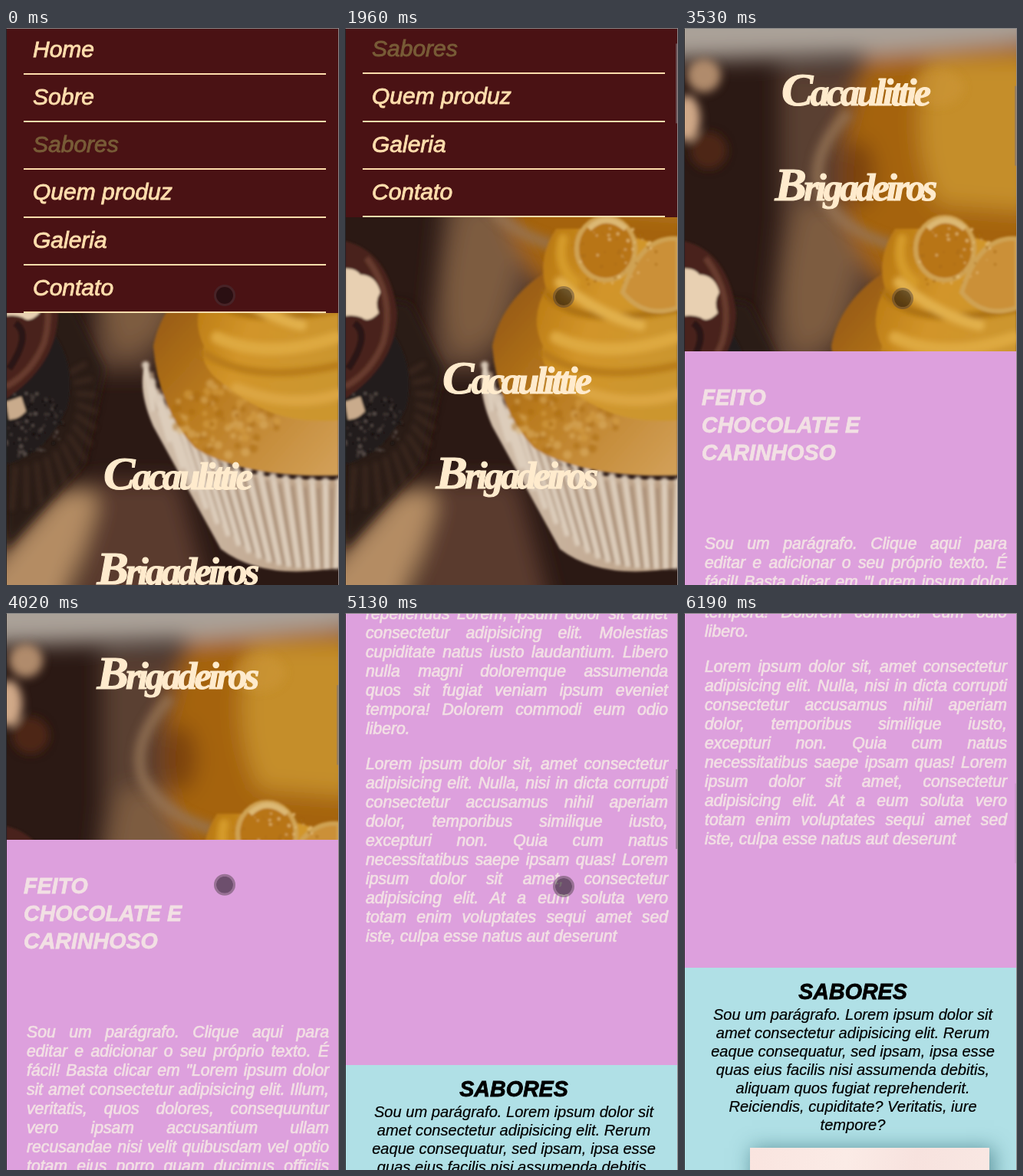
Write an HTML page that moves like this. It is 434 by 727 pixels and loops after 6330 ms.

```html
<!DOCTYPE html>
<html lang="pt">
<head>
<meta charset="utf-8">
<style>
  html, body { margin: 0; width: 100%; height: 100%; overflow: hidden; background: #231413; }
  #stage { position: relative; width: 434px; height: 727px; overflow: hidden;
    font-family: "Liberation Sans", Arial, sans-serif; font-style: italic; }
  #stage > *, section, section > *, h1 { position: absolute; margin: 0; }
  #photo { left: 0; top: 0; }
  #page { left: 0; top: 0; width: 434px; height: 2500px; will-change: transform; }
  section { left: 0; width: 434px; }

  #menu { top: 0; height: 372px; background: #4a1214; }
  ul { top: -1.2px; left: 23px; width: 394px; padding: 0; list-style: none; }
  li { box-sizing: border-box; height: 62.2px; padding-left: 12px; border-bottom: 2px solid #ffdead;
    font-size: 30px; line-height: 57px; color: #ffdead; -webkit-text-stroke: .9px; }
  li.hover { color: #785c37; }

  h1 { width: 445px; text-align: center; font: italic bold 50px/60px "Liberation Serif", "Times New Roman", serif;
    letter-spacing: -3.8px; color: #ffebcd; -webkit-text-stroke: 1.2px; }
  h1::first-letter { font-size: 62px; line-height: 1px; }

  #about { top: 923px; height: 1040px; background: #dda0dd; color: #f2e0e4; }
  h2 { font-size: 28.6px; -webkit-text-stroke: .8px; }
  #about h2 { left: 23px; top: 42px; line-height: 36px; }
  #about p { left: 27px; width: 394px; font-size: 21.2px; line-height: 25px; white-space: nowrap;
    text-align: justify; text-align-last: justify; -webkit-text-stroke: .7px; }
  #about span { display: block; text-align-last: left; }

  #flavours { top: 1963px; height: 537px; background: #b0e0e6; color: #000; text-align: center; }
  #flavours h2 { left: 0; width: 440px; top: 13px; line-height: 36px; }
  #flavours p { left: 0; width: 440px; top: 49px; font-size: 20.1px; line-height: 24px; white-space: nowrap;
    -webkit-text-stroke: .2px; }
  #card { left: 86px; top: 235px; width: 312px; height: 300px;
    background: linear-gradient(100deg, #f9e4df, #fbebe6 35%, #f7e2de 60%, #faeae5);
    box-shadow: 4px 2px 24px 2px rgba(20, 80, 90, .5); }

  #thumb { left: 431px; top: 0; width: 3px; height: 104px; background: rgba(125, 115, 120, .6); }
  #touch { left: -14px; top: -14px; width: 22px; height: 22px; border: 3px solid rgba(70, 58, 62, .45);
    border-radius: 50%; background: rgba(18, 14, 18, .55); background-clip: padding-box; }
  #edge { inset: 0; border: solid; border-width: 1px 1px 0 1px; border-color: #858585 #8f8889 #000 #26262a; }
</style>
</head>
<body>
<div id="stage">
  <svg id="photo" width="434" height="727">
    <defs>
      <filter id="far" x="-50%" y="-50%" width="200%" height="200%"><feGaussianBlur stdDeviation="14"/></filter>
      <filter id="mid" x="-50%" y="-50%" width="200%" height="200%"><feGaussianBlur stdDeviation="6"/></filter>
      <filter id="soft" x="-30%" y="-30%" width="160%" height="160%"><feGaussianBlur stdDeviation="3"/></filter>
      <filter id="near" x="-20%" y="-20%" width="140%" height="140%"><feGaussianBlur stdDeviation="1.4"/></filter>
      <linearGradient id="cake" x1="0" y1="0" x2="1" y2="1">
        <stop stop-color="#8c500f"/><stop offset=".45" stop-color="#b97a1d"/><stop offset="1" stop-color="#d3a15a"/>
      </linearGradient>
      <linearGradient id="icing" x1="0" y1="0" x2="1" y2=".5">
        <stop stop-color="#b4730c"/><stop offset=".5" stop-color="#d2952a"/><stop offset="1" stop-color="#cc962f"/>
      </linearGradient>
      <linearGradient id="paper" x1="0" x2="1">
        <stop stop-color="#d2bfab"/><stop offset=".5" stop-color="#c5ae98"/><stop offset="1" stop-color="#b89c80"/>
      </linearGradient>
    </defs>
    <rect width="434" height="727" fill="#2b1914"/>
    <g filter="url(#far)">
      <path d="M125 50H260V330L190 450H105L125 250Z" fill="#5a4031"/>
      <path d="M150 230H250L200 400L150 430Q110 380 150 230Z" fill="#7d5b40"/>
      <path d="M240 20H460V340H265Q190 270 205 150Z" fill="#a5640f"/>
      <path d="M320 40H460V240L330 230Q290 140 320 40Z" fill="#c58e2c"/>
      <ellipse cx="225" cy="190" rx="24" ry="45" fill="#7c430f"/>
      <path d="M-30-30H464V16L250 34L-30 42Z" fill="#aaa198"/>
      <path d="M110 590H225L270 760H90Z" fill="#5a3b2d"/>
      <path d="M-30 715L60 612Q110 580 118 625L70 770H-30Z" fill="#b48c64"/>
    </g>
    <g filter="url(#mid)">
      <path d="M215 110Q162 165 178 215Q200 262 275 285" fill="none" stroke="#977555" stroke-width="15" opacity=".8"/>
      <circle cx="26" cy="62" r="22" fill="#b08b6c"/>
      <ellipse cx="4" cy="118" rx="17" ry="30" fill="#d0a988"/>
      <circle cx="32" cy="160" r="24" fill="#4d2619"/>
      <ellipse cx="330" cy="78" rx="34" ry="24" fill="#d09c3c" opacity=".4"/>
      <path d="M0 345L85 360L128 445L100 570L0 680Z" fill="#2a1a16"/>
    </g>
    <g id="darkPleats" filter="url(#soft)" stroke="#493026" stroke-width="6" opacity=".6"></g>
    <g filter="url(#near)">
      <path d="M0 380L62 398Q92 440 80 495Q55 555 0 570Z" fill="#241b1a"/>
      <g id="crumbs" opacity=".7"></g>
      <path d="M0 278Q58 292 68 372Q66 440 0 484Z" fill="#48231b"/>
      <path d="M28 300Q66 350 50 410Q34 450 0 468" fill="none" stroke="#673a2e" stroke-width="8" filter="url(#near)"/>
      <path d="M12 385Q34 400 4 445" fill="none" stroke="#2c1512" stroke-width="9"/>
      <path d="M0 314Q14 313 20 322Q40 322 46 345Q38 358 44 372Q30 386 22 378Q12 374 0 376Z" fill="#e8d0b2"/>
      <path d="M0 488L20 481L26 500Q16 512 4 511Z" fill="#c9ab8c"/>
    </g>
    <g filter="url(#near)">
      <path d="M182 436Q196 515 244 556Q310 592 434 590V704Q335 722 280 680Q236 600 192 520Q170 470 182 436Z" fill="url(#paper)"/>
      <g id="pleats" fill="none" filter="url(#near)"></g>
      <path d="M272 312Q205 350 192 415Q198 495 246 548Q310 588 434 584V350Z" fill="url(#cake)"/>
      <g id="sponge" opacity=".5" filter="url(#near)"></g>
      <path d="M275 262Q250 300 262 340Q240 380 258 415Q250 445 292 470Q350 520 434 512V290L340 262Z" fill="url(#icing)"/>
      <g fill="none" stroke-linecap="round" filter="url(#soft)">
        <path d="M262 345Q300 395 434 366" stroke="#a96e10" stroke-width="9"/>
        <path d="M258 424Q320 466 434 440" stroke="#b67915" stroke-width="9"/>
        <path d="M280 332Q330 375 385 388" stroke="#e2b04b" stroke-width="14"/>
        <path d="M275 404Q340 434 430 404" stroke="#dea941" stroke-width="16"/>
        <path d="M300 470Q370 498 434 478" stroke="#dca643" stroke-width="14"/>
        <path d="M284 275Q275 310 300 332" stroke="#d59b2c" stroke-width="13"/>
      </g>
      <g stroke="#cfa253" stroke-width="6">
        <ellipse cx="340" cy="288" rx="38" ry="41" fill="#b87516"/>
        <path d="M362 345Q385 270 434 275V365Q390 380 362 345Z" fill="#cb9038"/>
      </g>
      <path d="M318 262Q340 240 366 262" fill="none" stroke="#dcb873" stroke-width="7"/>
      <g id="sugar" opacity=".7"></g>
    </g>
  </svg>

  <div id="page">
    <section id="menu"><ul>
      <li>Home<li>Sobre<li class="hover">Sabores<li>Quem produz<li>Galeria<li>Contato
    </ul></section>
    <h1 style="top:555px">Cacaulittie</h1>
    <h1 style="top:679px">Brigadeiros</h1>
    <section id="about">
      <h2>FEITO<br>CHOCOLATE E<br>CARINHOSO</h2>
      <p style="top:237.5px">Sou um parágrafo. Clique aqui para<br>editar e adicionar o seu próprio texto. É<br>fácil! Basta clicar em "Lorem ipsum dolor<br>sit amet consectetur adipisicing elit. Illum,<br>veritatis, quos dolores, consequuntur<br>vero ipsam accusantium ullam<br>recusandae nisi velit quibusdam vel optio<br>totam eius porro quam ducimus officiis<br>repellendus Lorem, ipsum dolor sit amet<br>consectetur adipisicing elit. Molestias<br>cupiditate natus iusto laudantium. Libero<br>nulla magni doloremque assumenda<br>quos sit fugiat veniam ipsum eveniet<br>tempora! Dolorem commodi eum odio<span>libero.</span></p>
      <p style="top:633.5px">Lorem ipsum dolor sit, amet consectetur<br>adipisicing elit. Nulla, nisi in dicta corrupti<br>consectetur accusamus nihil aperiam<br>dolor, temporibus similique iusto,<br>excepturi non. Quia cum natus<br>necessitatibus saepe ipsam quas! Lorem<br>ipsum dolor sit amet, consectetur<br>adipisicing elit. At a eum soluta vero<br>totam enim voluptates sequi amet sed<span>iste, culpa esse natus aut deserunt</span></p>
    </section>
    <section id="flavours">
      <h2>SABORES</h2>
      <p>Sou um parágrafo. Lorem ipsum dolor sit<br>amet consectetur adipisicing elit. Rerum<br>eaque consequatur, sed ipsam, ipsa esse<br>quas eius facilis nisi assumenda debitis,<br>aliquam quos fugiat reprehenderit.<br>Reiciendis, cupiditate? Veritatis, iure<br>tempore?</p>
      <div id="card"></div>
    </section>
  </div>
  <div id="thumb"></div>
  <div id="touch"></div>
  <div id="edge"></div>
</div>

<script>
const LOOP = 6330;
const $ = id => document.getElementById(id);
const clamp = x => Math.min(1, Math.max(0, x));
const smooth = p => p * p * (3 - 2 * p);
const easeOut = p => 1 - (1 - p) ** 2.4;

let seed = 7;
const random = () => (seed = seed * 16807 % 2147483647) / 2147483647;

// Scatter small dots inside an ellipse
function speckle(id, count, cx, cy, rx, ry, colors, size) {
  let dots = '';
  for (let i = 0; i < count; i++) {
    const a = random() * 2 * Math.PI, r = Math.sqrt(random());
    dots += `<circle cx="${cx + rx * r * Math.cos(a)}" cy="${cy + ry * r * Math.sin(a)}"
      r="${size * (.5 + random())}" fill="${colors[i % colors.length]}"/>`;
  }
  $(id).innerHTML = dots;
}

// Folds of the two paper cups
function foldPaper() {
  let light = '', dark = '';
  for (let i = 0; i < 18; i++) {
    const u = i / 17, x = 182 + 252 * u ** 1.2, y = 440 + 152 * (1 - (1 - u) ** 2.6);
    const footX = 192 + 238 * u ** .85, footY = 500 + 206 * (1 - (1 - u) ** 3.6);
    light += `<path d="M${x} ${y}L${footX} ${footY}" stroke="#ddcdbb" stroke-width="7"/>
      <path d="M${x + 8} ${y + 9}L${footX + 6} ${footY}" stroke="#a98e76" stroke-width="4"/>
      <circle cx="${x}" cy="${y}" r="5" fill="#d8c8b6"/>`;
  }
  for (let i = 0; i < 13; i++) {
    const a = -.5 + i * .17, c = Math.cos(a), s = Math.sin(a);
    dark += `<path d="M${10 + 82 * c} ${490 + 82 * s}L${4 + 115 * c} ${500 + 130 * s}"/>`;
  }
  $('pleats').innerHTML = light;
  $('darkPleats').innerHTML = dark;
}

foldPaper();
speckle('crumbs', 170, 18, 515, 58, 46, ['#4a403c', '#120d0d', '#665c58'], 1.8);
speckle('sponge', 110, 285, 510, 70, 48, ['#d9a44a', '#a8690f', '#e0b66c'], 4);
speckle('sugar', 60, 350, 300, 60, 42, ['#eccb8c', '#a96a12'], 1.5);

// [start, end, distance, easing]
const scrolls = [
  [1295, 1600, 125, smooth], [1955, 2240, 125, smooth], [2580, 2810, 125, smooth],
  [2970, 3220, 125, smooth], [3520, 3710, 125, smooth], [4007, 4200, 125, smooth],
  [4600, 5180, 625, easeOut], [5350, 5620, 125, smooth]
];
const scrollAt = t => scrolls.reduce((y, [a, b, d, ease]) => y + d * ease(clamp((t - a) / (b - a))), 0);

function frame(now) {
  const t = now % LOOP, y = scrollAt(t);
  const leave = smooth(clamp((t - 5600) / 570));
  const touchY = 349 + 2 * clamp((t - 1300) / 600) + 6 * clamp((t - 2900) / 1800);
  $('page').style.transform = `translateY(${-Math.round(y)}px)`;
  $('thumb').style.transform = `translateY(${2 + .147 * y}px)`;
  $('thumb').style.opacity = t < 1300 ? 0 : 1 - .75 * clamp((t - 6000) / 190);
  $('touch').style.transform = `translate(${285 + 130 * leave}px, ${touchY + 390 * leave}px)`;
  requestAnimationFrame(frame);
}
requestAnimationFrame(frame);
</script>
</body>
</html>
```
